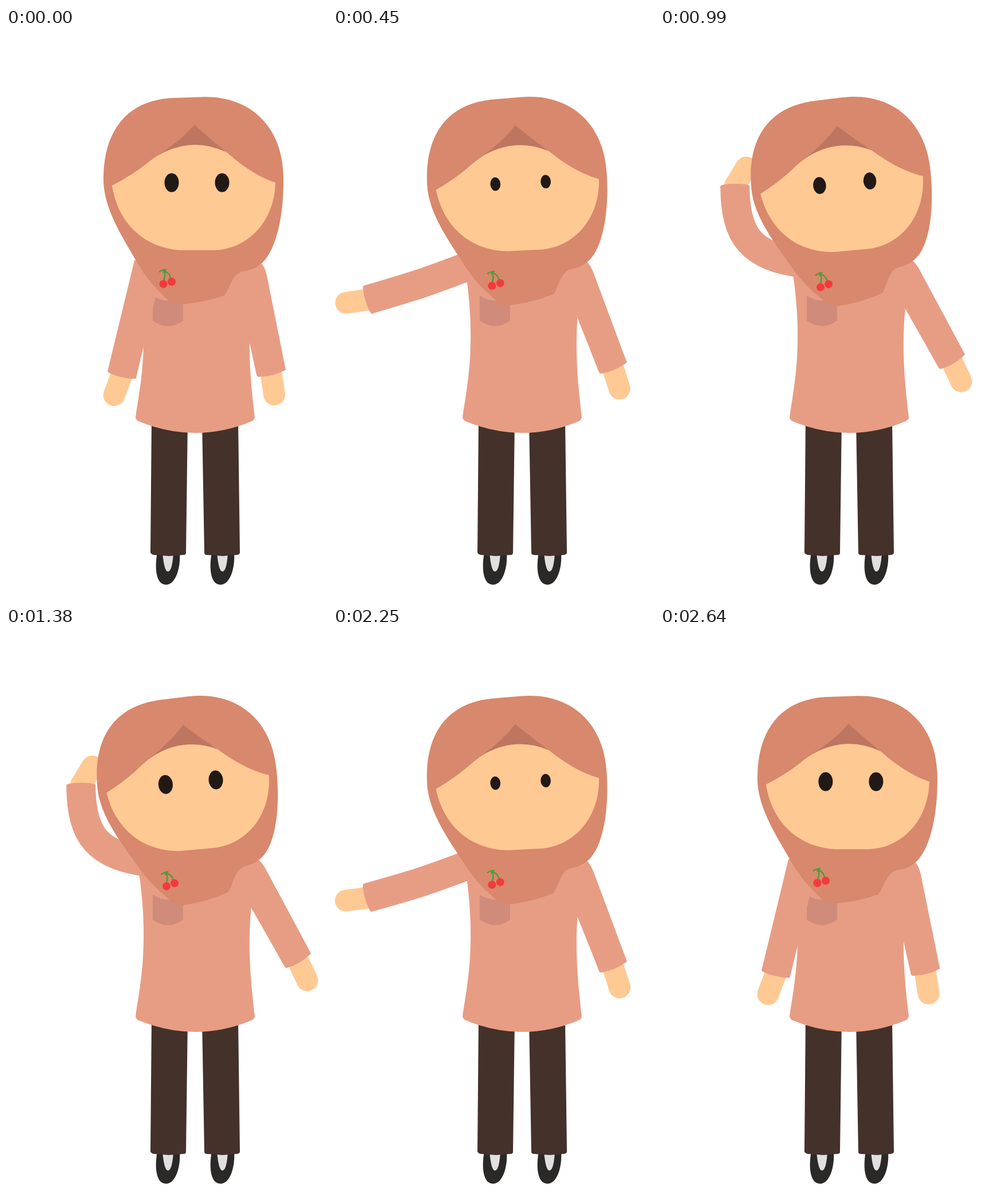
An HTML page that plays this animation: 560 by 997 pixels, repeating every 2700 ms.

```html
<!DOCTYPE html>
<html lang="en">
<head>
<meta charset="utf-8">
<title>Waving girl</title>
<style>
  html, body { margin: 0; height: 100%; overflow: hidden; background: #fff; }
  svg { display: block; width: 100vw; height: 100vh; }
  .cloth { fill: #e79d84; }
  .scarf { fill: #d8886c; }
  .skin { fill: #ffc993; }
  .hand { fill: none; stroke: #ffc993; stroke-width: 38; stroke-linecap: round; }
  .sleeve { fill: none; stroke: #e79d84; stroke-width: 51; }
  .stem { fill: none; stroke: #4f9a3e; stroke-width: 2.4; }
</style>
</head>
<body>
<svg viewBox="0 0 560 997">
  <defs>
    <g id="shoe">
      <path fill="#2a2928" d="M264 916C260 935 259 972 279 972C297 972 305 940 303 916Z"/>
      <path fill="#e0e0e0" d="M273 916C275 938 278 949 282.5 949C288 949 291 935 292 916Z"/>
    </g>
  </defs>

  <use href="#shoe"/>
  <use href="#shoe" x="95"/>
  <g fill="#43312a">
    <path d="M254 685L252 916Q253 919 258 920L284 922L310 920Q314 920 314 916L317 685Z"/>
    <path d="M342 685L346 916Q346 920 350 920L378 922L403 920Q408 919 408 916L405 685Z"/>
  </g>

  <path class="cloth" d="M228 405C236 450 241 500 240 550C239 610 229 655 226 680Q227 685 232 687Q331 727 428 687Q433 685 434 680C427 620 421 560 428 488L445 410Z"/>
  <path fill="#d18b7a" d="M256 467Q282 485 309 467V511Q283 530 256 511Z"/>

  <path id="waveHand" class="hand"/>
  <path id="waveArm" class="sleeve"/>
  <ellipse id="cuff" class="cloth" rx="4" ry="25.5"/>

  <g id="restArm">
    <path class="hand" d="M462 600L468 640"/>
    <path class="cloth" d="M400 440L425 395L445 410Q452 418 455 432L488 597Q466 609 441 609Q438 609 437 605L426 555Z"/>
  </g>

  <g id="head">
    <path class="scarf" d="M340 120.5C425 117 484 172 484 262C485 330 470 395 442 414Q430 423 412 425Q401 428 393 444Q387 458 381 467Q345 480 300 483Q288 482 275 468Q245 440 225 403C205 368 170 315 170 265C170 175 215 124 295 122Z"/>
    <path fill="#be7660" d="M329 169Q305 197 268 220H388Q355 193 329 169Z"/>
    <path class="skin" d="M185 275Q220 257 245 237Q258 226 275 217Q330 191 385 217Q430 257 470 270C468 340 420 388 360 388H305C240 384 195 340 185 275Z"/>
    <g fill="#211915">
      <ellipse class="eye" cx="289" cy="270"/>
      <ellipse class="eye" cx="377" cy="270"/>
    </g>
    <path class="stem" d="M276 423Q279 432 275 441M276 424Q286 428 287 437M267 426Q272 422 280 422M278 422L274 427"/>
    <g fill="#f23a3c">
      <circle cx="274.5" cy="447" r="7"/>
      <circle cx="289" cy="443" r="7"/>
    </g>
  </g>
</svg>
<script>
  const LOOP = 2700;
  const SHOULDER = [249, 411];
  const $ = id => document.getElementById(id);
  const eyes = document.querySelectorAll('.eye');

  // Smooth 0 to 1 between two times
  const ease = (t, from, to) => {
    const u = Math.min(1, Math.max(0, (t - from) / (to - from)));
    return u * u * (3 - 2 * u);
  };

  // Step from a point; 0 degrees is down, 90 left, 180 up
  const step = ([x, y], angle, length) => {
    const a = angle * Math.PI / 180;
    return [x - Math.sin(a) * length, y + Math.cos(a) * length];
  };

  function poseArm(t) {
    const swing = 13.6 + 125.2 * ease(t, 100, 840);
    const bend = 41 * ease(t, 390, 830);
    const reach = 200 - bend / 2;
    const wrist = step(SHOULDER, swing, reach);
    const near = step(SHOULDER, swing - bend, reach / 2);
    const far = step(wrist, swing + bend, -reach / 2);
    const palm = step(wrist, swing + 7 + 1.6 * bend, 38);
    $('waveArm').setAttribute('d', `M${SHOULDER}C${near} ${far} ${wrist}`);
    $('waveHand').setAttribute('d', `M${wrist}L${palm}`);
    $('cuff').setAttribute('transform', `translate(${wrist}) rotate(${swing + bend + 90})`);
  }

  function draw(now) {
    const time = now % LOOP;
    const t = Math.min(time, LOOP + 4 - time); // out and back
    const turn = ease(t, 20, 840);
    const open = 1 - 0.75 * (ease(t, 270, 700) - ease(t, 700, 1080));

    poseArm(t);
    $('restArm').setAttribute('transform', `rotate(${-16.9 * turn} 419 435)`);
    $('head').setAttribute('transform', `rotate(${-5.2 * turn} 339 389)`);
    for (const eye of eyes) {
      eye.setAttribute('rx', 12.5 * open);
      eye.setAttribute('ry', 16.5 * open);
    }
  }

  function tick() {
    draw(performance.now());
    requestAnimationFrame(tick);
  }
  tick();
</script>
</body>
</html>
```
